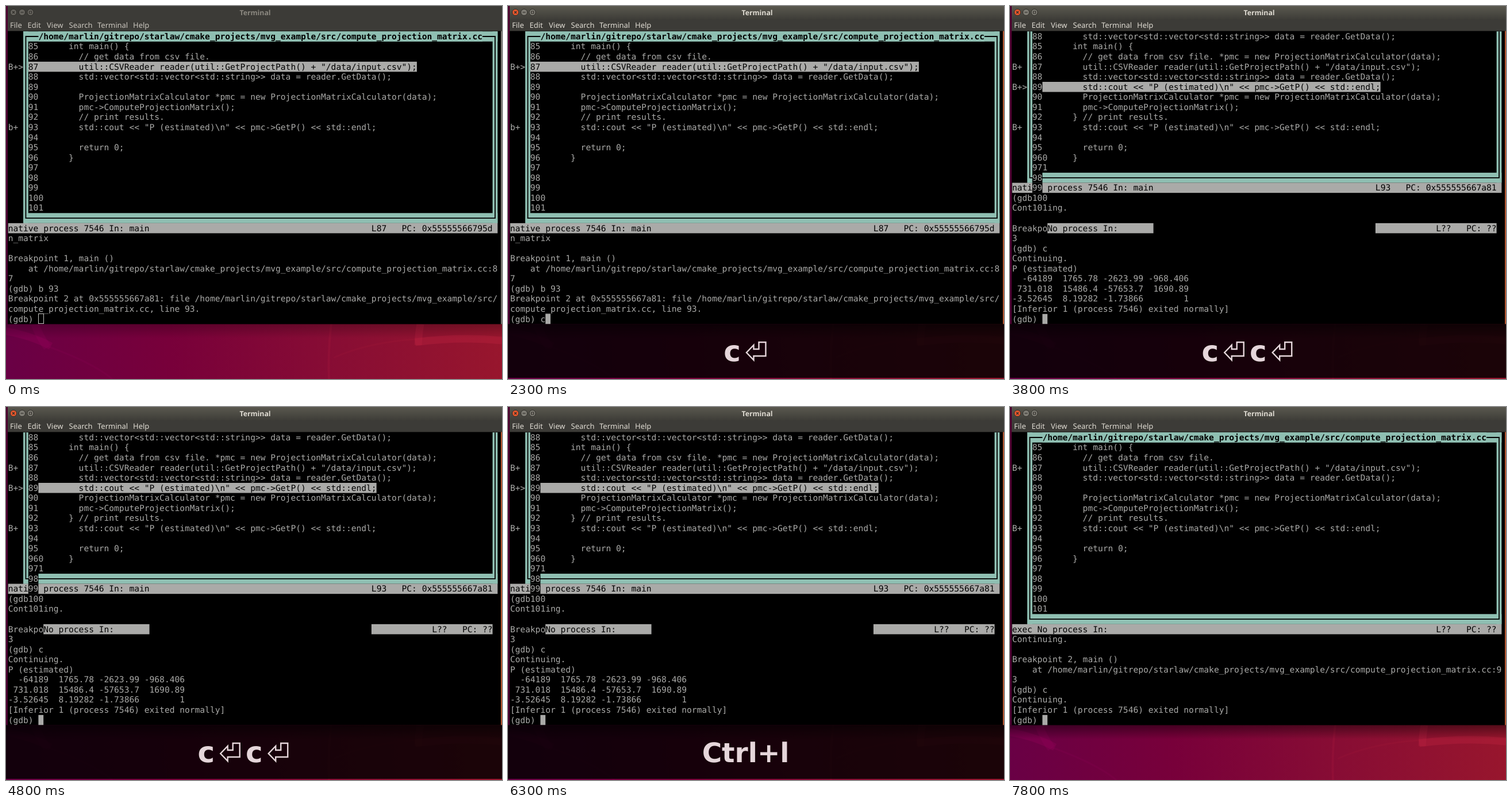
These frames come from a looping animation (863 px wide and 649 px high, 8000 ms). An HTML page with a canvas:

```html
<!DOCTYPE html>
<html lang="en">
<head>
<meta charset="utf-8">
<title>Terminal</title>
<style>
html, body { margin: 0; width: 100%; height: 100%; overflow: hidden; background: #000; }
canvas { display: block; }
</style>
</head>
<body>
<canvas id="stage" width="863" height="649"></canvas>
<script>
const ctx = document.getElementById('stage').getContext('2d');
const LOOP = 8000;
const CELL_W = 8.78, CELL_H = 17.56, LEFT = 3.7, TOP = 44.2, COLS = 97;
const GREY = '#aaaaa8', TEAL = '#8fbfb2', BLACK = '#000';
const MONO = '14.58px "DejaVu Sans Mono", monospace';

const SRC = '/home/marlin/gitrepo/starlaw/cmake_projects/mvg_example/src/';
const FILE = 'compute_projection_matrix.cc';
const VECTOR = '  std::vector<std::vector<std::string>> data = reader.GetData();';
const COUT = '  std::cout << "P (estimated)\\n" << pmc->GetP() << std::endl;';
const CODE = [
  'int main() {',
  '  // get data from csv file.',
  '  util::CSVReader reader(util::GetProjectPath() + "/data/input.csv");',
  VECTOR,
  '',
  '  ProjectionMatrixCalculator *pmc = new ProjectionMatrixCalculator(data);',
  '  pmc->ComputeProjectionMatrix();',
  '  // print results.',
  COUT,
  '',
  '  return 0;',
  '}', '', '', '', '', ''
];
const GARBLED = CODE.slice(0, 13);
GARBLED[1] += ' *pmc = new ProjectionMatrixCalculator(data);';
GARBLED[4] = COUT;
GARBLED[7] = '} // print results.';

const stopAt = (n, line) => [`Breakpoint ${n}, main ()`, `    at ${SRC}${FILE}:${line[0]}`, line[1]];
const SET_BREAK = [`Breakpoint 2 at 0x555555667a81: file ${SRC}`, `${FILE}, line 93.`];
const EXITED = '[Inferior 1 (process 7546) exited normally]';
const LOG_START = ['n_matrix', '', ...stopAt(1, '87'), '(gdb) b 93', ...SET_BREAK];
const LOG_STOPPED = [...SET_BREAK, '(gdb) c', 'Continuing.', '', ...stopAt(2, '93')];
const LOG_EXIT = [
  '3', '(gdb) c', 'Continuing.', 'P (estimated)',
  '  -64189  1765.78 -2623.99 -968.406',
  ' 731.018  15486.4 -57653.7  1690.89',
  '-3.52645  8.19282 -1.73866        1',
  EXITED
];
const LOG_CLEAN = ['Continuing.', '', ...stopAt(2, '93'), '(gdb) c', 'Continuing.', EXITED];

const colX = col => LEFT + col * CELL_W;
const rowY = row => TOP + row * CELL_H;
const between = (t, a, b) => t >= a && t < b;

function rect(x0, y0, x1, y1, fill) {
  ctx.fillStyle = fill;
  ctx.fillRect(x0, y0, x1 - x0, y1 - y0);
}

function fillCells(row, from, to, fill) {
  rect(colX(from), rowY(row), colX(to), rowY(row + 1), fill);
}

function print(row, col, text, color = GREY, weight = '') {
  ctx.font = weight + MONO;
  ctx.textAlign = 'left';
  ctx.fillStyle = color;
  [...text].forEach((ch, i) => {
    if (ch !== ' ') ctx.fillText(ch, colX(col + i), rowY(row) + 13.7);
  });
}

function printReverse(row, col, text, end = col + text.length) {
  fillCells(row, col, end, GREY);
  print(row, col, text, BLACK);
}

function path(points, color, width, close) {
  ctx.beginPath();
  points.forEach(([x, y]) => ctx.lineTo(x, y));
  if (close) ctx.closePath();
  ctx.strokeStyle = color;
  ctx.lineWidth = width;
  ctx.stroke();
}

function curve(x0, y0, cx, cy, x1, y1, color, width) {
  ctx.beginPath();
  ctx.moveTo(x0, y0);
  ctx.quadraticCurveTo(cx, cy, x1, y1);
  ctx.strokeStyle = color;
  ctx.lineWidth = width;
  ctx.stroke();
}

function gradient(x0, y0, x1, y1, ...colors) {
  const g = ctx.createLinearGradient(x0, y0, x1, y1);
  colors.forEach((c, i) => g.addColorStop(i / (colors.length - 1), c));
  return g;
}

function drawDesktop(focused) {
  rect(0, 0, 863, 649, gradient(0, 649, 863, 560, '#690045', '#78003a', '#880d34', '#98162d'));
  rect(0, 0, 3, 553, 'rgba(0,0,0,.3)');
  curve(0, 566, 45, 574, 78, 592, 'rgba(150,0,90,.3)', 13);
  curve(50, 553, 58, 575, 72, 594, 'rgba(150,0,90,.22)', 14);
  curve(72, 592, 150, 620, 185, 649, 'rgba(150,0,90,.14)', 3);
  curve(566, 553, 560, 600, 562, 649, 'rgba(200,40,70,.13)', 4);
  curve(570, 612, 630, 585, 712, 580, 'rgba(200,40,70,.08)', 3);
  curve(721, 553, 718, 570, 717, 590, 'rgba(190,35,65,.3)', 13);
  curve(712, 585, 790, 575, 863, 582, 'rgba(190,35,65,.35)', 13);
  const shade = focused ? .45 : .25;
  rect(0, 553, 863, 578, gradient(0, 553, 0, 578, `rgba(0,0,0,${shade})`, 'rgba(0,0,0,0)'));
}

function drawButton(x, fill, glyph) {
  ctx.beginPath();
  ctx.arc(x, 11, 5.6, 0, 7);
  ctx.fillStyle = fill;
  ctx.fill();
  ctx.strokeStyle = '#2d2c28';
  ctx.lineWidth = 1;
  ctx.stroke();
  glyph.forEach(line => path(line.map(([dx, dy]) => [x + dx, 11 + dy]), '#33312d', 1.2));
}

function drawWindow(focused) {
  rect(3, 0, 863, 44, '#3c3b37');
  if (focused) rect(3, 0, 863, 23, gradient(0, 0, 0, 23, '#5a584f', '#3e3d38'));
  const dull = focused ? '#7d7b73' : '#65635d';
  drawButton(13, focused ? '#e4572c' : dull, [[[-2, -2], [2, 2]], [[2, -2], [-2, 2]]]);
  drawButton(28, dull, [[[-2.5, 0], [2.5, 0]]]);
  drawButton(42.5, dull, [[[-2, -2], [2, -2], [2, 2], [-2, 2], [-2, -2]]]);

  ctx.font = 'bold 12.3px "Noto Sans", sans-serif';
  ctx.textAlign = 'center';
  ctx.fillStyle = focused ? '#dfdbd2' : '#8b8880';
  ctx.fillText('Terminal', 433.5, 15.6);
  ctx.font = '13px "Noto Sans", sans-serif';
  ctx.textAlign = 'left';
  ctx.fillStyle = focused ? '#dfdbd2' : '#c9c5bd';
  [['File', 7], ['Edit', 37.5], ['View', 71], ['Search', 109.5], ['Terminal', 159], ['Help', 221]]
    .forEach(([label, x]) => ctx.fillText(label, x, 38));

  rect(3, 43.5, 863, 553.5, BLACK);
  rect(861, 43.5, 863, 553.5, focused ? '#b5552f' : '#77736d');
}

function drawFrame(top, bottom) {
  const x0 = colX(3.5), x1 = colX(96.5), y1 = rowY(bottom + .5);
  for (const col of [3, 96]) rect(colX(col), rowY(0), colX(col + 1), rowY(bottom + 1), TEAL);
  fillCells(bottom, 3, COLS, TEAL);
  if (top) fillCells(0, 3, COLS, TEAL);
  const y0 = top ? rowY(.5) : rowY(0);
  path([[x0, y0], [x0, y1], [x1, y1], [x1, y0]], BLACK, 1.8, top);
  if (top) {
    fillCells(0, 6, 94, TEAL);
    print(0, 6, SRC + FILE, BLACK, 'bold ');
  }
}

function drawStatus(row, left, line, pc) {
  fillCells(row, 0, COLS, GREY);
  print(row, 0, left, BLACK);
  const right = `L${line}   PC: ${pc}`;
  print(row, 96 - right.length, right, BLACK);
}

function drawSource(current, marks) {
  drawFrame(true, 18);
  CODE.forEach((code, i) => {
    const text = String(85 + i).padEnd(8) + code;
    (85 + i === current ? printReverse : print)(i + 1, 4, text);
  });
  print(3, 0, marks[0]);
  print(9, 0, marks[1]);
}

function drawGarbled() {
  drawFrame(false, 14);
  print(0, 4, '88      ' + VECTOR);
  GARBLED.forEach((code, i) => {
    const number = 85 + i + (i > 10 ? '01'[i - 11] : '');
    if (i === 4) printReverse(5, 6, '      ' + code);
    else print(i + 1, 12, code);
    print(i + 1, 4, number);
  });
  print(3, 0, 'B+');
  print(5, 0, 'B+>');
  print(9, 0, 'B+');
  drawStatus(15, 'nati   process 7546 In: main', 93, '0x555555667a81');
  for (const row of [14, 15]) {
    fillCells(row, 4, 6, BLACK);
    print(row, 4, String(84 + row));
  }
  print(16, 0, '(gdb100');
  print(17, 0, 'Cont101ing.');
  print(19, 0, 'Breakpo');
  printReverse(19, 7, 'No process In:', 28);
  printReverse(19, 72, 'L??   PC: ??'.padStart(24));
}

function drawPrompt(log, typed, cursor) {
  log.forEach((line, i) => print(28 - log.length + i, 0, line));
  print(28, 0, '(gdb) ' + typed);
  const col = 6 + typed.length;
  if (cursor === 'solid') fillCells(28, col, col + 1, GREY);
  if (cursor === 'hollow') {
    ctx.strokeStyle = '#c4c4c0';
    ctx.lineWidth = 1;
    ctx.strokeRect(56.5, 535.5, 9, 17);
  }
}

function drawTerminal(t) {
  if (t < 2500) {
    drawSource(87, ['B+>', 'b+']);
    drawStatus(19, 'native process 7546 In: main', 87, '0x55555566795d');
    const cursor = t < 700 ? 'hollow' : between(t, 1300, 1600) ? '' : 'solid';
    drawPrompt(LOG_START, t < 1600 ? '' : 'c', cursor);
  } else if (t < 3800) {
    drawSource(93, ['B+', 'B+>']);
    drawStatus(19, 'native process 7546 In: main', 93, '0x555555667a81');
    drawPrompt(LOG_STOPPED, t < 3100 ? '' : 'c', 'solid');
  } else {
    const off = between(t, 4200, 4800) || between(t, 5400, 5800) || between(t, 7000, 7600);
    if (t < 6500) {
      drawGarbled();
    } else {
      drawSource(0, ['B+', 'B+']);
      drawStatus(19, 'exec No process In:', '??', '??');
    }
    drawPrompt(t < 6500 ? LOG_EXIT : LOG_CLEAN, '', off ? '' : 'solid');
  }
}

function drawReturnKey(x) {
  const shape = [[23, 585], [35, 585], [35, 609], [14, 609], [14, 616], [1.5, 603], [14, 590], [14, 597], [23, 597]];
  path(shape.map(([dx, y]) => [x + dx, y]), '#e5d6da', 2.4, true);
}

function drawKeys(t) {
  let keys = '';
  if (between(t, 1400, 5100)) keys = t < 2300 ? 'c' : t < 2900 ? 'c⏎' : t < 3800 ? 'c⏎c' : 'c⏎c⏎';
  if (between(t, 6300, 7800)) keys = 'Ctrl+l';
  if (!keys) return;
  rect(0, 553.5, 863, 647, 'rgba(0,0,0,.82)');
  ctx.textAlign = 'center';
  ctx.fillStyle = '#e5d6da';
  const font = size => `bold ${size}px "DejaVu Sans", sans-serif`;
  if (keys === 'Ctrl+l') {
    ctx.font = font(47);
    ctx.fillText(keys, 413.5, 617.5);
    return;
  }
  ctx.font = font(50);
  const pairs = Math.floor(keys.length / 2);
  const width = pairs * 83.5 + (keys.length % 2 ? 25 : -11);
  [...keys].forEach((key, i) => {
    const x = 413.7 - width / 2 + Math.floor(i / 2) * 83.5;
    if (key === 'c') ctx.fillText(key, x + 12.5, 617.5);
    else drawReturnKey(x + 36);
  });
}

function draw() {
  const t = performance.now() % LOOP;
  const focused = t >= 700;
  ctx.textRendering = 'geometricPrecision';
  drawDesktop(focused);
  drawWindow(focused);
  drawTerminal(t);
  drawKeys(t);
  requestAnimationFrame(draw);
}
draw();
</script>
</body>
</html>
```
